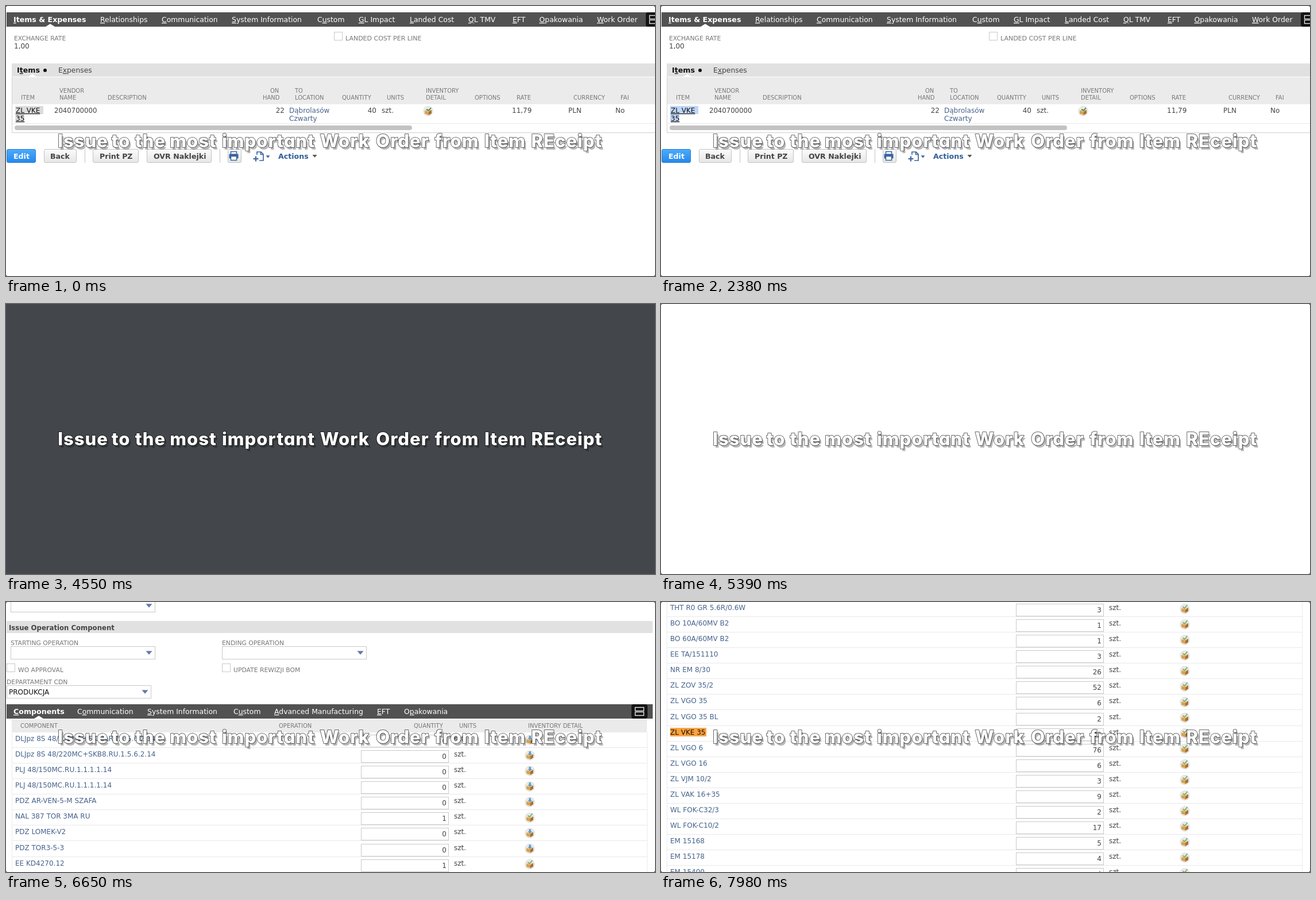
Write an HTML page that moves like this. It is 1130 px wide and 470 px high and loops after 8 s.

```html
<!DOCTYPE html>
<html lang="en">
<head>
<meta charset="utf-8">
<title>Issue to Work Order</title>
<style>
  html, body { margin: 0; width: 100%; height: 100%; overflow: hidden; background: #fff; }
  svg { display: block; width: 1130px; height: 470px; }
  text { font: 12px "DejaVu Sans", sans-serif; fill: #444; white-space: pre; }
  .label { font-size: 10.8px; fill: #777; }
  .head { font-size: 10px; fill: #777; }
  .tab { font-size: 12.4px; fill: #fff; }
  .bold { font-weight: 700; font-size: 12.6px; }
  .black { fill: #111; }
  .white { fill: #fff; }
  .blue { fill: #46638c; }
  .action { fill: #2f5c97; }
  .link { fill: #111; text-decoration: underline; }
  .end { text-anchor: end; }
  .key { text-decoration: underline; }
  .title text { font: 800 31px Inter, "Open Sans", sans-serif; letter-spacing: 1px; font-feature-settings: "cv11"; text-anchor: middle; }
  .shade text { fill: #000; fill-opacity: .28; }
  .face text { fill: #fff; stroke: #000; stroke-opacity: .58; stroke-width: 2px; stroke-linejoin: round; paint-order: stroke; }
</style>
</head>
<body>
<svg id="stage" viewBox="0 0 1130 470" xmlns="http://www.w3.org/2000/svg">
  <defs>
    <linearGradient id="primary" x2="0" y2="1">
      <stop offset="0" stop-color="#4cabfb"/><stop offset="1" stop-color="#2488ec"/>
    </linearGradient>
    <linearGradient id="plain" x2="0" y2="1">
      <stop offset="0" stop-color="#fbfbfb"/><stop offset="1" stop-color="#e6e6e6"/>
    </linearGradient>
    <g id="box">
      <circle r="8.2" fill="#e9eceb" stroke="#d2d5d4" stroke-width=".8"/>
      <path d="M-6-1 0-4 6-2 1 1z" fill="#f0cf94"/>
      <path d="M-6-1 1 1V7L-6 4.500z" fill="#d9a252"/>
      <path d="M1 1 6-2V4L1 7z" fill="#a96f30"/>
    </g>
    <g id="arrow"><use href="#box"/><path d="M-1.500-7H2V-3H4L.2.500-3.500-3H-1.500z" fill="#5d9cc8"/></g>
    <g id="check"><use href="#box"/><path d="M-3.500-4-.5-1 4.500-7" fill="none" stroke="#79b27d" stroke-width="1.8"/></g>
    <g id="pencil"><use href="#box"/><path d="M-3-3 1-1 5-6" fill="none" stroke="#4c8a55" stroke-width="2"/></g>
  </defs>
</svg>
<script>
const stage = document.getElementById('stage');
const STEP = 70, LOOP = 8000;

const text = (x, y, s, cls = '', size = 0) =>
  `<text x="${x}" y="${y}" class="${cls}"${size ? ` style="font-size:${size}px"` : ''}>` +
  s.replace(/&/g, '&amp;').replace(/_(.)/g, '<tspan class="key">$1</tspan>') + '</text>';
const rect = (x, y, w, h, fill, extra = '') =>
  `<rect x="${x}" y="${y}" width="${w}" height="${h}" fill="${fill}" ${extra}/>`;
const frame = (x, y, w, h, color = '#c9c9c9', fill = '#fff', extra = '') =>
  rect(x + .5, y + .5, w - 1, h - 1, fill, `stroke="${color}" ${extra}`);
const path = (d, fill, extra = '') => `<path d="${d}" fill="${fill}" ${extra}/>`;
const down = (x, y, w, color) => path(`M${x - w} ${y - w / 2}h${2 * w}l${-w} ${w * 1.2}z`, color);
const notch = (x, y) => path(`M${x - 8} ${y}l8-5 8 5z`, '#fff');
const icon = (name, x, y) => `<use href="#${name}" x="${x}" y="${y}"/>`;
const heads = (y, list) => list.map(([x, s]) => text(x, y, s, 'head')).join('');

// Dark tab bar: labels with x, the open tab and the layout button
function tabBar(y, width, tabs, open, buttonX) {
  let out = rect(1, y, width, 25, '#525252');
  tabs.forEach(([x, s], i) => out += text(x, y + 17, s, i === open ? 'tab bold' : 'tab'));
  out += rect(buttonX, y, 28, 25, '#141414', 'rx="4"');
  for (const dy of [5, 13])
    out += frame(buttonX + 6, y + dy, 16, 7, '#eee', 'none', 'stroke-width="1.3"');
  return out;
}

function button(x, w, label, tx, primary) {
  return frame(x, 249, w, 24, primary ? '#2a7fd2' : '#c2c2c2', `url(#${primary ? 'primary' : 'plain'})`, 'rx="2.500"') +
    text(tx, 266, label, 'bold ' + (primary ? 'white' : ''));
}

function toolbar() {
  const ink = '#3a659f';
  return button(1, 51, 'Edit', 13, true) + button(66, 57, 'Back', 77) +
    rect(137, 249, 1, 24, '#c4c4c4') + button(151, 80, 'Print PZ', 163) +
    button(245, 113, 'OVR Naklejki', 257) + rect(372, 249, 1, 24, '#c4c4c4') +
    frame(386, 249, 24, 24, '#c2c2c2', 'url(#plain)', 'rx="2.500"') +
    frame(391, 253, 11, 6, ink, '#fff', 'stroke-width="1.500"') +
    rect(388.5, 257.5, 16, 8, ink, 'rx="1"') +
    frame(391, 261, 11, 8, ink, '#fff', 'stroke-width="1.500"') +
    path('M437 259V254H444L448 258V269H441M443.500 254V258.500H448', 'none', `stroke="${ink}" stroke-width="1.700"`) +
    path('M430.500 266H439.500M435 261.500V270.500', 'none', `stroke="${ink}" stroke-width="2.200"`) +
    down(456, 262, 3.5, ink) + text(474, 266, 'Actions', 'bold action') + down(537.5, 261, 4, '#555');
}

const mainTabs = ['_Items & Expenses', '_Relationships', '_Communication', '_System Information', 'C_ustom',
  '_GL Impact', '_Landed Cost', '_QL TMV', '_EFT', '_Opakowania', '_Work Order'];
const placed = xs => xs.map((x, i) => [x, mainTabs[i]]);

function receipt() {
  return tabBar(11, 1129, placed([13, 164, 271, 393, 542, 614, 703, 805, 882, 928.5, 1029]), 0, 1114) + notch(77, 36) +
    text(14, 60, 'EXCHANGE RATE', 'label') + text(14, 74, '1,00') +
    frame(571, 45, 15, 15) + text(591, 60, 'LANDED COST PER LINE', 'label', 11) +
    rect(10, 100, 1120, 23, '#e1e1e1') + text(19, 116, 'I_tems', 'bold black') +
    '<circle cx="68" cy="112" r="3" fill="#111"/>' + text(91, 116, 'E_xpenses', '', 12.3) +
    rect(10, 124, 1120, 47, '#ebebeb') + notch(46, 123.5) +
    heads(151, [[93, 'VENDOR'], [460, 'ON'], [503, 'TO'], [731, 'INVENTORY']]) +
    heads(163, [[26, 'ITEM'], [93, 'NAME'], [177, 'DESCRIPTION'], [447, 'HAND'], [503, 'LOCATION'], [585, 'QUANTITY'],
      [663, 'UNITS'], [731, 'DETAIL'], [816, 'OPTIONS'], [889, 'RATE'], [988, 'CURRENCY'], [1070, 'FAI']]) +
    '<g id="pick">' + rect(16, 174, 49, 14, 'inherit') + rect(16, 188, 16, 14, 'inherit') + '</g>' +
    text(17, 186, 'ZL VKE', 'link') + text(17, 200, '35', 'link') +
    text(84, 186, '2040700000', '', 11.7) + text(485, 186, '22', 'end') +
    text(493, 186, 'Dąbrolasów', 'blue') + text(493, 200, 'Czwarty', 'blue') +
    text(645, 186, '40', 'end') + text(654, 186, 'szt.') + icon('pencil', 735, 183) +
    text(881, 186, '11,79') + text(979, 186, 'PLN') + text(1061, 186, 'No') +
    rect(10, 204, 1120, 1, '#e8e8e8') + rect(15, 208, 692, 8, '#c3c3c3', 'rx="4"') +
    rect(10, 220, 1120, 1, '#cfcfcf') + rect(10, 123, 1, 97, '#d2d2d2') + toolbar();
}

function orders() {
  return tabBar(11, 1129, placed([13, 150, 257, 379, 529, 600, 689, 791, 868, 915, 1016]), 10, 1109) + notch(1056, 36) +
    rect(10, 45, 1120, 23, '#e1e1e1') + text(19, 61, 'List of Work Orders', 'bold black', 12.3) +
    '<circle cx="164" cy="57" r="3" fill="#111"/>' + notch(95, 68) +
    rect(10, 77, 1120, 5, '#e1e1e1') + rect(10, 83, 1120, 23, '#ebebeb') +
    heads(98, [[26, 'ISSUE'], [112, 'TRANSACTION ID'], [268, 'ITEM'], [357, 'COMMITTED'], [480, 'QUANTITY'],
      [592, 'WO END DATE'], [723, 'ASSEMBLY'], [952, 'PARENT TRANSACTION']]) +
    path('M667 97h5.500l-2.700-5z', '#666') +
    rect(10, 106, 1120, 27, '#fefeee') + rect(10, 133, 1120, 1, '#cfcfcf') + rect(10, 68, 1, 65, '#d2d2d2') +
    text(17, 120, 'Issue', 'link') + text(103, 120, 'WO-26/23', 'link') + text(259, 120, 'ZL VKE 35') +
    text(348, 120, '2') + text(471, 120, '2') + text(583, 120, '2023-03-09') +
    text(714, 120, 'R-220DC/R-220AC SO-784/22', 'link') + text(943, 120, 'Sales Order #SO-784/22') +
    `<g transform="translate(0 -88)">${toolbar()}</g>`;
}

const select = (x, y, w = 252) => frame(x, y, w, 23) + down(x + w - 11, y + 11, 5.5, '#5f7bab');

// Component rows: [name, quantity, icon], first baseline at top
function rows(list, top) {
  return list.map(([name, qty, mark = 'check'], i) => {
    const y = +(top + i * 27.07).toFixed(1), edge = Math.round(y);
    return text(16, y, name, 'blue') + frame(618, edge - 11, 153, 22) + text(767, y + 4, String(qty), 'end') +
      text(780, y, 'szt.') + icon(mark, 912, y - 2) + rect(10, edge + 11, 1106, 1, '#e9e9e9');
  }).join('') + rect(10, Math.max(0, top - 15), 1, 470, '#ebebeb') + rect(1116, Math.max(0, top - 15), 1, 470, '#ebebeb');
}

function form() {
  const a = 'arrow';
  return select(8, -5) + rect(1, 33, 1125, 21, '#e1e1e1') + text(5, 49, 'Issue Operation Component', 'bold', 11.7) +
    text(8, 75, 'STARTING OPERATION', 'label') + select(8, 77) +
    text(376, 75, 'ENDING OPERATION', 'label') + select(376, 77) +
    frame(1, 107, 15, 15) + text(21, 122, 'WO APPROVAL', 'label') +
    frame(376, 107, 15, 15) + text(396, 122, 'UPDATE REWIZJI BOM', 'label') +
    text(1, 143, 'DEPARTAMENT CDN', 'label') + select(1, 145) + text(5, 161, 'PRODUKCJA', 'black') +
    rows([['DLJpz 8S 48/220MC+SKB8.RU.1.5.6.2.14', 0, a], ['DLJpz 8S 48/220MC+SKB8.RU.1.5.6.2.14', 0, a],
      ['PLJ 48/150MC.RU.1.1.1.1.14', 0, a], ['PLJ 48/150MC.RU.1.1.1.1.14', 0, a], ['PDZ AR-VEN-5-M SZAFA', 0, a],
      ['NAL 387 TOR 3MA RU', 1], ['PDZ LOMEK-V2', 0, a], ['PDZ TOR3-5-3', 0, a], ['EE KD4270.12', 1]], 242) +
    rect(10, 204, 1106, 23, '#ebebeb') +
    heads(219, [[25, 'COMPONENT'], [475, 'OPERATION'], [710, 'QUANTITY'], [789, 'UNITS'], [909, 'INVENTORY DETAIL']]) +
    tabBar(178, 1125, [[13, '_Components'], [124, 'C_ommunication'], [246, '_System Information'], [396, 'C_ustom'],
      [467, '_Advanced Manufacturing'], [646, '_EFT'], [693, 'O_pakowania']], 0, 1089) + notch(57, 203);
}

function found() {
  return rows([['THT R0 GR 5.6R/0.6W', 3], ['BO 10A/60MV B2', 1], ['BO 60A/60MV B2', 1], ['EE TA/151110', 3],
    ['NR EM 8/30', 26], ['ZL ZOV 35/2', 52], ['ZL VGO 35', 6], ['ZL VGO 35 BL', 2], ['', 22], ['ZL VGO 6', 76],
    ['ZL VGO 16', 6], ['ZL VJM 10/2', 3], ['ZL VAK 16+35', 9], ['WL FOK-C32/3', 2], ['WL FOK-C10/2', 17],
    ['EM 15168', 5], ['EM 15178', 4], ['EM 15400', 4]], 14) +
    rect(16, 219, 63, 15, '#ffa23e') + text(16, 231, 'ZL VKE 35', 'black');
}

// Each word is centred on its x
function title() {
  const words = [[134, 'Issue'], [200, 'to'], [251.5, 'the'], [326, 'most'], [457, 'important'], [590, 'Work'],
    [690.5, 'Order'], [785, 'from'], [869, 'Item'], [976.5, 'REceipt']].map(([x, s]) => text(x, 246, s)).join('');
  return `<g class="title"><g class="shade" transform="translate(3 4)">${words}</g><g class="face">${words}</g></g>`;
}

const corners = path('M0 0h2L0 2zM1130 0v2l-2-2zM0 470v-2l2 2zM1130 470h-2l2-2z', '#4a4a4a');
const scenes = [
  [0, receipt()],
  [3570, orders()],
  [3990, rect(0, 0, 1130, 470, '#43474b')],
  [5390, ''],
  [5460, form()],
  [7770, found()]
];

stage.insertAdjacentHTML('beforeend', rect(0, 0, 1130, 470, '#fff') +
  scenes.map(s => `<g class="scene">${s[1]}</g>`).join('') + corners + title());
const layers = [...stage.querySelectorAll('.scene')];
const pick = document.getElementById('pick');
for (const r of pick.children) r.removeAttribute('fill');

function draw(now) {
  const t = Math.floor((now % LOOP) / STEP) * STEP;
  const current = scenes.filter(s => s[0] <= t).length - 1;
  layers.forEach((g, i) => g.style.display = i === current ? '' : 'none');
  pick.setAttribute('fill', t < 1120 ? '#dcdcdc' : '#bfd6f8');
}

let start;
function tick(now) {
  start ??= now;
  draw(now - start);
  requestAnimationFrame(tick);
}
draw(0);
requestAnimationFrame(tick);
</script>
</body>
</html>
```
